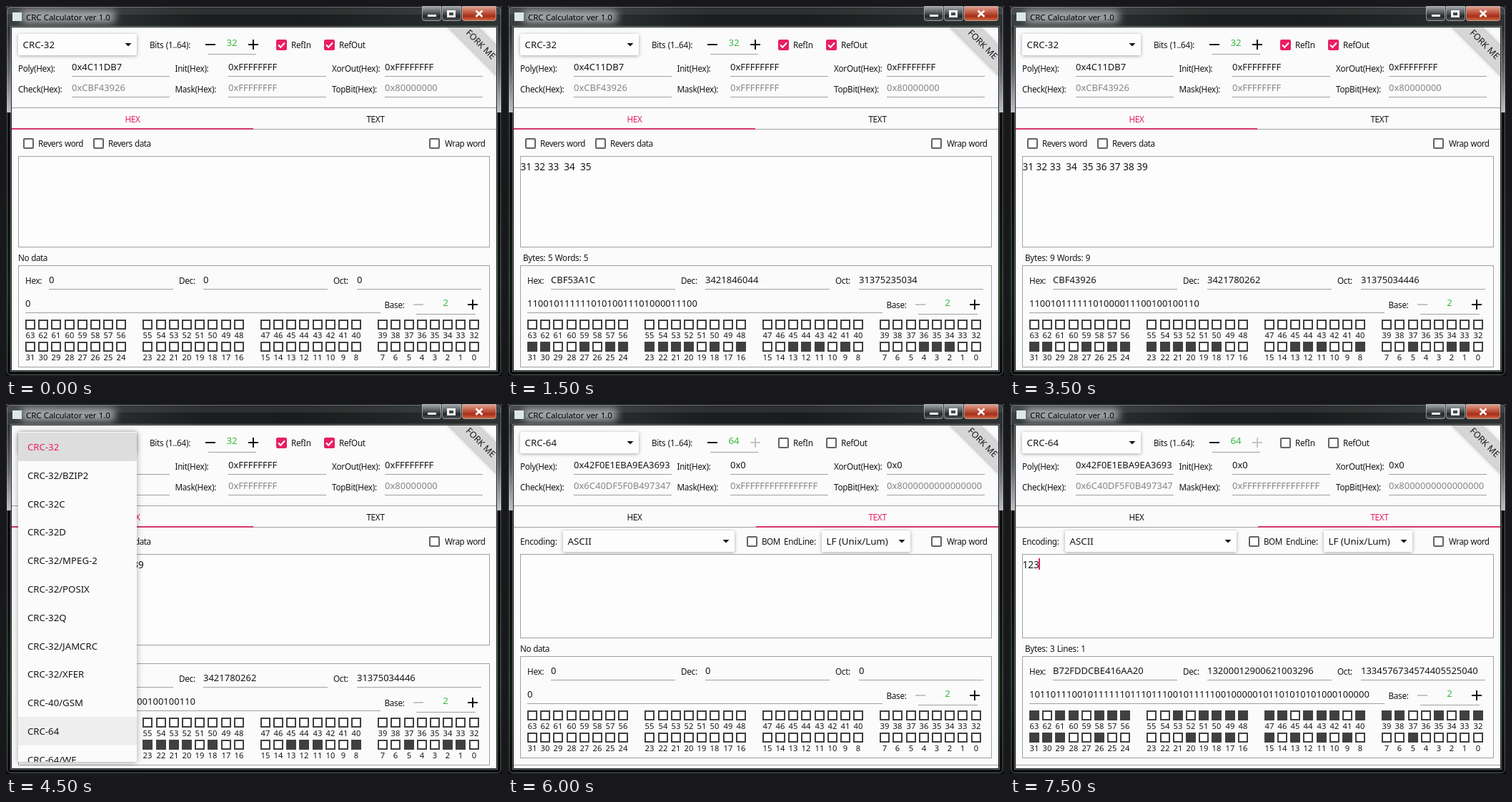
An HTML page with a canvas for the animation above (8000 ms loop, 694 px wide and 518 px high).

```html
<!DOCTYPE html>
<html lang="en">
<head>
<meta charset="utf-8">
<title>CRC Calculator</title>
<style>
html, body { margin: 0; width: 100%; height: 100%; overflow: hidden; background: #000; }
canvas { display: block; }
</style>
</head>
<body>
<canvas id="stage" width="694" height="518"></canvas>
<script>
const g = document.getElementById('stage').getContext('2d');
const INK = '#161616', GREY = '#868686', LINE = '#a0a0a0', PAGE = '#fbfbfb',
      PINK = '#e91e63', GREEN = '#3cb943', BOX = '#404040', OFF = '#c4c4c4';
const LOOP = 8000, STEP = 500;

// ---- model ----
const MODELS = {
  'CRC-32': { bits: 32, poly: 0x4C11DB7n, init: 0xFFFFFFFFn, xor: 0xFFFFFFFFn, ref: true },
  'CRC-64': { bits: 64, poly: 0x42F0E1EBA9EA3693n, init: 0n, xor: 0n, ref: false }
};
const MENU = ['CRC-32', 'CRC-32/BZIP2', 'CRC-32C', 'CRC-32D', 'CRC-32/MPEG-2', 'CRC-32/POSIX',
  'CRC-32Q', 'CRC-32/JAMCRC', 'CRC-32/XFER', 'CRC-40/GSM', 'CRC-64', 'CRC-64/WE'];
const HEX_TEXT = '31 32 33  34  35 36 37 38 39';
const HEX_ENDS = [0, 2, 5, 8, 12, 16, 19, 22, 25, 28];
const DIGITS = '123456789';

function reflect(value, bits) {
  let out = 0n;
  for (let i = 0; i < bits; i++) out = out << 1n | value >> BigInt(i) & 1n;
  return out;
}

function crc(m, text) {
  const top = BigInt(m.bits - 1), mask = (1n << BigInt(m.bits)) - 1n;
  let r = m.init;
  for (const ch of text) {
    const code = BigInt(ch.charCodeAt(0));
    r ^= (m.ref ? reflect(code, 8) : code) << top - 7n;
    for (let i = 0; i < 8; i++) r = r >> top ? (r << 1n ^ m.poly) & mask : r << 1n;
  }
  return (m.ref ? reflect(r, m.bits) : r) ^ m.xor;
}

const upper = v => v.toString(16).toUpperCase();
const hex = v => '0x' + upper(v);

// One state per half second
const hexStates = [0, 1, 3, 5, 6, 7, 8, 9].map(n => ({ model: 'CRC-32', n }));
const STATES = [
  ...hexStates,
  { model: 'CRC-32', n: 9, menu: true },
  { model: 'CRC-32', n: 9, menu: true, hover: 'CRC-64' },
  { model: 'CRC-64', n: 9 },
  { model: 'CRC-64', n: 9, tabHover: true },
  { model: 'CRC-64', n: 0, text: true },
  { model: 'CRC-64', n: 1, text: true },
  { model: 'CRC-64', n: 2, text: true },
  { model: 'CRC-64', n: 3, text: true, caret: true }
];

// ---- drawing helpers ----
function rect(x, y, w, h, fill) {
  g.fillStyle = fill;
  g.fillRect(x, y, w, h);
}

function frame(x, y, w, h, color = LINE, width = 1) {
  g.strokeStyle = color;
  g.lineWidth = width;
  g.strokeRect(x + width / 2, y + width / 2, w - width, h - width);
}

function fade(x0, y0, x1, y1, ...colors) {
  const f = g.createLinearGradient(x0, y0, x1, y1);
  colors.forEach((c, i) => f.addColorStop(i / (colors.length - 1), c));
  return f;
}

function poly(points, fill) {
  g.beginPath();
  points.forEach(([x, y]) => g.lineTo(x, y));
  g.closePath();
  g.fillStyle = fill;
  g.fill();
}

function text(s, x, y, { size = 13, color = INK, align = 'left', gap = 0, space = 0 } = {}) {
  g.font = `${size}px "Noto Sans", "Open Sans", sans-serif`;
  g.letterSpacing = gap + 'px';
  g.wordSpacing = space + 'px';
  g.textAlign = align;
  g.fillStyle = color;
  g.fillText(s, x, y);
}

const label = (s, x, y, o) => text(s, x, y, { size: 11.7, gap: -0.28, space: 0.7, ...o });
const word = (s, x, y) => label(s, x, y, { gap: -0.48 });

function field(s, x, y, w, color) {
  g.save();
  g.beginPath();
  g.rect(x - 1, y - 16, w + 1, 22);
  g.clip();
  text(s, x, y, { color });
  g.restore();
  rect(x, Math.round(y + 8), w, 1, LINE);
}

function raised(x, y, w, h, blur = 5) {
  g.save();
  g.shadowColor = 'rgba(0,0,0,.34)';
  g.shadowBlur = blur;
  g.shadowOffsetY = 1;
  g.beginPath();
  g.roundRect(x, y, w, h, 2);
  g.fillStyle = '#fdfdfd';
  g.fill();
  g.restore();
}

function combo(s, x, y, w) {
  raised(x, y, w, 30);
  text(s, x + 6.5, y + 20, { size: 13.3 });
  const a = x + w - 12;
  poly([[a - 4.5, y + 13], [a + 4.5, y + 13], [a, y + 17.5]], INK);
}

function check(x, y, on) {
  g.beginPath();
  g.roundRect(x + 1, y + 1, 13, 13, 1);
  g.lineWidth = 2;
  g.strokeStyle = on ? PINK : '#636363';
  g.fillStyle = on ? PINK : '#fff';
  g.fill();
  g.stroke();
  if (!on) return;
  g.beginPath();
  g.moveTo(x + 3, y + 7.5);
  g.lineTo(x + 6.2, y + 10.7);
  g.lineTo(x + 12, y + 4.5);
  g.strokeStyle = '#fff';
  g.stroke();
}

function spin(value, minus, mid, plus, y, x, w, canDown, canUp) {
  const sign = on => on ? '#111' : OFF;
  rect(minus - 7, y - 1, 14, 2, sign(canDown));
  rect(plus - 7, y - 1, 14, 2, sign(canUp));
  rect(plus - 1, y - 7, 2, 14, sign(canUp));
  text(value, mid, y + 2, { color: GREEN, align: 'center', size: 13.3 });
  rect(x, y + 13, w, 1, LINE);
}

// ---- window parts ----
function windowFrame() {
  rect(0, 0, 694, 518, '#0c0e0e');
  rect(0, 0, 694, 29, fade(0, 0, 694, 0, '#3b3e40', '#2b2e30', '#1b1d1e', '#1a1c1d', '#232627', '#303334'));
  rect(0, 0, 694, 12, 'rgba(255,255,255,.08)');
  for (const x of [0, 686]) {
    rect(x, 29, 8, 120, fade(0, 29, 0, 149, '#2c2f30', '#5f6365', '#bcc0c2'));
    rect(x, 149, 8, 369, fade(0, 149, 0, 518, '#0b0c0c', '#0d110e', '#102013', '#0a0c0b'));
  }
  g.save();
  g.filter = 'blur(6px)';
  rect(22, 7, 130, 16, 'rgba(225,228,229,.72)');
  g.restore();
  g.beginPath();
  g.roundRect(0.5, 0.5, 693, 517, 6);
  g.strokeStyle = '#000';
  g.lineWidth = 1;
  g.stroke();
  g.beginPath();
  g.roundRect(1.5, 1.5, 691, 515, 5);
  g.strokeStyle = 'rgba(190,205,208,.45)';
  g.stroke();
  rect(9, 9, 13, 12, '#dce8e8');
  text('CRC Calculator ver 1.0', 28, 19.5, { size: 11.6, gap: -0.15, space: 0.5, color: '#000' });

  const glass = fade(0, 1, 0, 21, '#a3a6a8', '#66696b', '#25282a', '#54585a');
  const red = fade(0, 1, 0, 21, '#dfa18f', '#c7654e', '#a72e17', '#d4714b');
  for (const [x, w, fill] of [[582, 27, glass], [610, 27, glass], [638, 48, red]]) {
    g.beginPath();
    g.roundRect(x + 0.5, 0.5, w - 1, 20, [0, 0, 3, 3]);
    g.fillStyle = fill;
    g.fill();
    g.lineWidth = 1;
    g.strokeStyle = 'rgba(220,225,226,.6)';
    g.stroke();
  }
  rect(590, 12, 12, 3, '#f5f5f5');
  frame(617, 6, 12, 10, '#f5f5f5', 3);
  g.beginPath();
  g.moveTo(657.5, 6.5); g.lineTo(666.5, 15);
  g.moveTo(666.5, 6.5); g.lineTo(657.5, 15);
  g.lineWidth = 2.6;
  g.strokeStyle = '#fff';
  g.stroke();

  frame(6, 28, 682, 484, 'rgba(205,215,217,.45)');
  frame(7, 29, 680, 482, '#1a1c1c');
  rect(8, 30, 678, 480, PAGE);
}

function ribbon() {
  g.save();
  g.beginPath();
  g.rect(8, 30, 678, 112);
  g.clip();
  g.shadowColor = 'rgba(0,0,0,.4)';
  g.shadowBlur = 5;
  poly([[610, 20], [650, 20], [700, 70], [700, 110]], '#d6d6d6');
  g.shadowColor = 'transparent';
  g.translate(664, 54);
  g.rotate(Math.PI / 4);
  text('FORK ME', 0, 4, { size: 12.3, align: 'center' });
  g.restore();
}

function settings(name, m) {
  const n = BigInt(m.bits);
  combo(name, 17, 39, 166);
  label('Bits (1..64):', 201, 59);
  spin(m.bits, 286, 316, 346, 54, 283, 67, true, m.bits < 64);
  check(378, 47, m.ref);
  label('RefIn', 399, 59);
  check(445, 47, m.ref);
  label('RefOut', 466, 59);
  [['Poly', m.poly, 17, 92], ['Init', m.init, 236.5, 311], ['XorOut', m.xor, 456, 530]]
    .forEach(([s, v, x, fx]) => {
      label(s + '(Hex):', x, 92);
      field(hex(v), fx, 89.5, 137);
    });
  [['Check', crc(m, DIGITS), 17, 92], ['Mask', (1n << n) - 1n, 236.5, 311], ['TopBit', 1n << n - 1n, 456, 530]]
    .forEach(([s, v, x, fx]) => {
      label(s + '(Hex):', x, 121);
      field(hex(v), fx, 118.5, 137, GREY);
    });
}

function tabs(s) {
  rect(8, 142, 678, 1, LINE);
  if (s.tabHover) rect(347, 143, 339, 29, '#e6e6e6');
  rect(8, 172, 678, 1, LINE);
  rect(s.text ? 347 : 8, 171, s.text ? 339 : 338, 2, '#d3376b');
  label('HEX', 177, 162.5, { align: 'center', color: s.text ? INK : PINK });
  label('TEXT', 517, 162.5, { align: 'center', color: s.text ? PINK : INK });
}

function editor(s) {
  if (s.text) {
    label('Encoding:', 17, 197);
    combo('ASCII', 77, 177, 240);
    check(334, 185, false);
    word('BOM', 355, 197);
    label('EndLine:', 386, 197);
    combo('LF (Unix/Lum)', 439, 177, 124);
  } else {
    check(24, 185, false);
    word('Revers word', 45, 197);
    check(122, 185, false);
    word('Revers data', 143, 197);
  }
  check(592, 185, false);
  word('Wrap word', 614, 197);

  const h = s.text ? 118 : 128;
  rect(17, 210, 660, h, '#fdfdfd');
  frame(17, 210, 660, h);
  const shown = s.text ? DIGITS.slice(0, s.n) : HEX_TEXT.slice(0, HEX_ENDS[s.n]);
  text(shown, 17.5, 229.5, { size: 13.6 });
  if (s.caret) rect(40, 216, 2, 16, PINK);
}

function result(s, m) {
  const value = s.n ? crc(m, DIGITS.slice(0, s.n)) : 0n;
  g.save();
  if (s.text) {
    rect(8, 505, 678, 1, LINE);
    g.translate(0, -10);
  }
  if (s.n) label(`Bytes: ${s.n} ${s.text ? 'Lines: 1' : 'Words: ' + s.n}`, 21, 357);
  else word('No data', 17, 357);
  frame(17, 363, 660, 143);
  label('Hex:', 27, 389);
  field(upper(value), 60, 387.5, 174);
  label('Dec:', 242, 389);
  field(value.toString(), 276, 387.5, 174);
  label('Oct:', 458, 389);
  field(value.toString(8), 491, 387.5, 174);
  field(value.toString(2), 27, 420.5, 497);
  label('Base:', 529.5, 423);
  spin(2, 577, 615, 653, 418, 574, 83, false, true);

  for (let i = 0; i < 64; i++) {
    const col = i % 32, y = i < 32 ? 439 : 470, bit = 63 - i;
    const x = Math.round(27 + (col >> 3) * 164.4 + col % 8 * 18.2);
    if (value >> BigInt(bit) & 1n) rect(x, y, 14, 14, BOX);
    else {
      rect(x, y, 14, 14, '#fff');
      frame(x, y, 14, 14, BOX, 2);
    }
    text(bit, x + 7, y + 26, { size: 11.2, align: 'center' });
  }
  g.restore();
}

function menu(s) {
  raised(17, 39, 166, 462, 9);
  g.save();
  g.beginPath();
  g.rect(17, 39, 166, 462);
  g.clip();
  rect(17, 39, 166, 462, PAGE);
  MENU.forEach((item, i) => {
    const y = 40 + i * 39.8, current = item === s.model;
    if (current) rect(17, y, 166, 39.8, '#dddddd');
    else if (item === s.hover) rect(17, y, 166, 39.8, '#eeeeee');
    text(item, 30, y + 25, { size: 13.2, color: current ? PINK : INK });
  });
  g.restore();
}

function draw() {
  const s = STATES[Math.floor(performance.now() % LOOP / STEP)];
  const m = MODELS[s.model];
  windowFrame();
  settings(s.model, m);
  ribbon();
  tabs(s);
  editor(s);
  result(s, m);
  if (s.menu) menu(s);
  requestAnimationFrame(draw);
}
draw();
</script>
</body>
</html>
```
